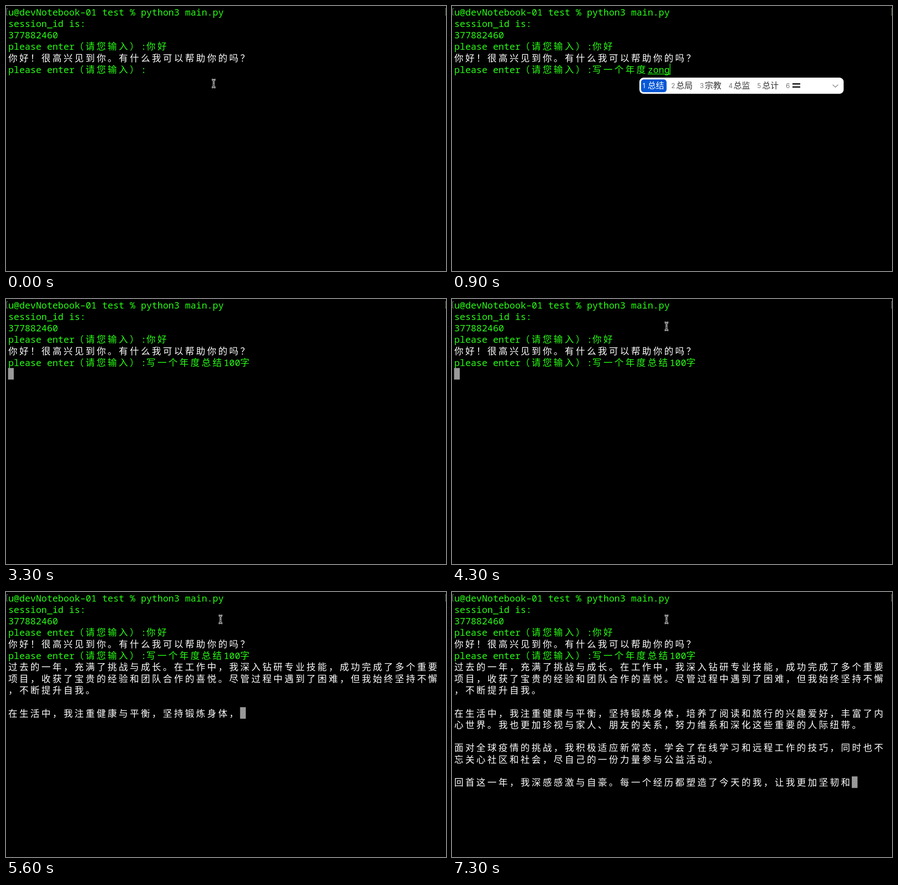
These frames come from a looping animation (963x581 px, 7.4 s). An HTML page:

```html
<!DOCTYPE html>
<html lang="zh-CN">
<head>
<meta charset="utf-8">
<title>Terminal chat</title>
<style>
  html, body { margin: 0; width: 100%; height: 100%; overflow: hidden; background: #000; }
  svg { display: block; }
  text { white-space: pre; }
  .term { font: 500 20px "Noto Sans Mono", "Noto Sans CJK SC", "Noto Sans CJK", monospace; }
  .menu { font: 18px "Noto Sans CJK SC", "Noto Sans CJK", sans-serif; }
  .num { font: 14px Inter, "Liberation Sans", sans-serif; }
</style>
</head>
<body>
<svg id="stage" width="963" height="581" viewBox="0 0 963 581"></svg>
<script>
const LOOP = 7400, STEP = 100;
const CELL = 12.09, ROW = 25.3, LEFT = 5;
const GREEN = '#28fe14', WHITE = '#fff';
const PROMPT = 'please enter（请您输入）:';
const REQUEST = '写一个年度总结100字';

const HISTORY = [
  ['u@devNotebook–01 test % python3 main.py', GREEN],
  ['session_id is:', GREEN],
  ['377882460', GREEN],
  [PROMPT + '你好', GREEN],
  ['你好！很高兴见到你。有什么我可以帮助你的吗？', WHITE]
];

const ANSWER = [
  '过去的一年，充满了挑战与成长。在工作中，我深入钻研专业技能，成功完成了多个重要',
  '项目，收获了宝贵的经验和团队合作的喜悦。尽管过程中遇到了困难，但我始终坚持不懈',
  '，不断提升自我。',
  '',
  '在生活中，我注重健康与平衡，坚持锻炼身体，培养了阅读和旅行的兴趣爱好，丰富了内',
  '心世界。我也更加珍视与家人、朋友的关系，努力维系和深化这些重要的人际纽带。',
  '',
  '面对全球疫情的挑战，我积极适应新常态，学会了在线学习和远程工作的技巧，同时也不',
  '忘关心社区和社会，尽自己的一份力量参与公益活动。',
  '',
  '回首这一年，我深感感激与自豪。每一个经历都塑造了今天的我，让我更加坚韧和'
];

// Committed text, pinyin being composed, candidate words
const TYPING = [
  [''],
  [''],
  ['', 'xie', '写 些 谢 鞋 斜 协'],
  ['', 'xieyige', '写一个 写意 写一 些 写 谢'],
  ['写一个'],
  ['写一个', 'nian', '年 念 粘 碾 撵 捻'],
  ['写一个', 'niandu', '年度 粘度 年 念 粘 碾'],
  ['写一个年度'],
  ['写一个年度', 'z'],
  ['写一个年度', 'zong', '总结 总局 宗教 总监 总计 〓'],
  ['写一个年度', 'zongjie', '总结 宗杰 总 宗 综 纵'],
  ['写一个年度总结'],
  ['写一个年度总结100'],
  ['写一个年度总结100', 'zi', '字 子 自 紫 资 字数']
];

// Step number and characters of the answer printed by then
const PRINTED = [[44, 0], [45, 6], [47, 24], [56, 107], [71, 242], [73, 261]];

const width = ch => ch.charCodeAt(0) >= 0x2e80 ? 2 : 1;
const columns = s => [...s].reduce((sum, ch) => sum + width(ch), 0);
const colX = col => LEFT + col * CELL;
const rowY = row => row * ROW - 0.5;

function rect(x, y, w, h, fill, r = 0) {
  return `<rect x="${x}" y="${y}" width="${w}" height="${h}" rx="${r}" fill="${fill}"/>`;
}

function line(row, text, color, col = 0) {
  if (!text) return '';
  const xs = [...text].map(ch => {
    const x = colX(col).toFixed(2);
    col += width(ch);
    return x;
  });
  return `<text class="term" x="${xs.join(' ')}" y="${rowY(row) + 21}" fill="${color}">${text}</text>`;
}

const block = (row, col) => rect(colX(col) - 0.5, rowY(row), 12.5, ROW, '#999');

function pointer(x, y) {
  const d = 'M-4-8.5Q0-8.5 0-5.5Q0-8.5 4-8.5M0-5.5V5.5M-4 8.5Q0 8.5 0 5.5Q0 8.5 4 8.5M-2 3H2';
  const stroke = (color, w) => `<path d="${d}" fill="none" stroke="${color}" stroke-width="${w}"/>`;
  return `<g transform="translate(${x} ${y})">${stroke('#fff', 3.4)}${stroke('#000', 1.2)}</g>`;
}

function candidates(left, words) {
  let out = rect(left, 157, 447, 35.5, '#fff', 9), x = left + 7;
  words.split(' ').forEach((word, i) => {
    const w = word.length * 18, first = i === 0;
    if (first) out += rect(x - 3.5, 161, w + 20, 28, '#0758d6', 6);
    out += `<text class="num" x="${x}" y="180" fill="${first ? '#fff' : '#777'}">${i + 1}</text>`;
    if (word === '〓') {
      out += rect(x + 14.5, 169, 17, 3.6, '#333') + rect(x + 14.5, 175.8, 17, 3.6, '#333');
    } else {
      out += `<text class="menu" x="${x + 11}" y="181" fill="${first ? '#fff' : '#333'}">${word}</text>`;
    }
    x += w + 26.7;
  });
  return out + `<path d="M${left + 423} 172.5l6 5.5 6-5.5" fill="none" stroke="#888" stroke-width="1.5"/>`;
}

function promptLine(step) {
  const [done, pinyin, words] = TYPING[step] || [REQUEST];
  const col = columns(PROMPT + done), x = colX(col);
  let out = line(5, PROMPT + done, GREEN);
  if (pinyin) {
    const w = pinyin.length * CELL;
    out += line(5, pinyin, GREEN, col) + rect(x, 148.5, w, 1.4, GREEN) + rect(x + w, 126, 1.4, 25, GREEN);
    if (words) out += candidates(x - 18, words);
  } else if (step > 0 && step < TYPING.length) {
    out += block(5, col);
  }
  return out;
}

function printedAt(step) {
  const i = PRINTED.findIndex(([s]) => s >= step);
  if (i <= 0) return 0;
  const [s0, n0] = PRINTED[i - 1], [s1, n1] = PRINTED[i];
  return Math.round(n0 + (n1 - n0) * (step - s0) / (s1 - s0));
}

function answer(step) {
  let left = printedAt(step), out = '';
  if (!left) {
    const lit = step === 14 || (step > 14 && step % 2 === 1);
    return lit ? block(6, 0) : '';
  }
  for (let i = 0; i < ANSWER.length; i++) {
    const shown = ANSWER[i].slice(0, left);
    out += line(6 + i, shown, WHITE);
    if (left <= ANSWER[i].length) return out + block(6 + i, columns(shown));
    left -= shown.length;
  }
  return out;
}

function mouse(step) {
  if (step === 0) return pointer(454.5, 170);
  if (step === 1) return pointer(188.5, 100.5);
  return step >= 36 ? pointer(469.5, 60) : '';
}

function draw(step) {
  const brackets = '<path d="M4 5.5H1.5V20H4M961 5.5H962.5V20H961" fill="none" stroke="#6b8a68"/>';
  stage.innerHTML = rect(0, 0, 963, 581, '#000') + brackets
    + HISTORY.map(([text, color], row) => line(row, text, color)).join('')
    + promptLine(step) + answer(step) + mouse(step);
}

const stage = document.getElementById('stage');
const start = performance.now();
let current = -1;

function tick() {
  const step = Math.floor((performance.now() - start) % LOOP / STEP);
  if (step !== current) draw(current = step);
  requestAnimationFrame(tick);
}
tick();
</script>
</body>
</html>
```
